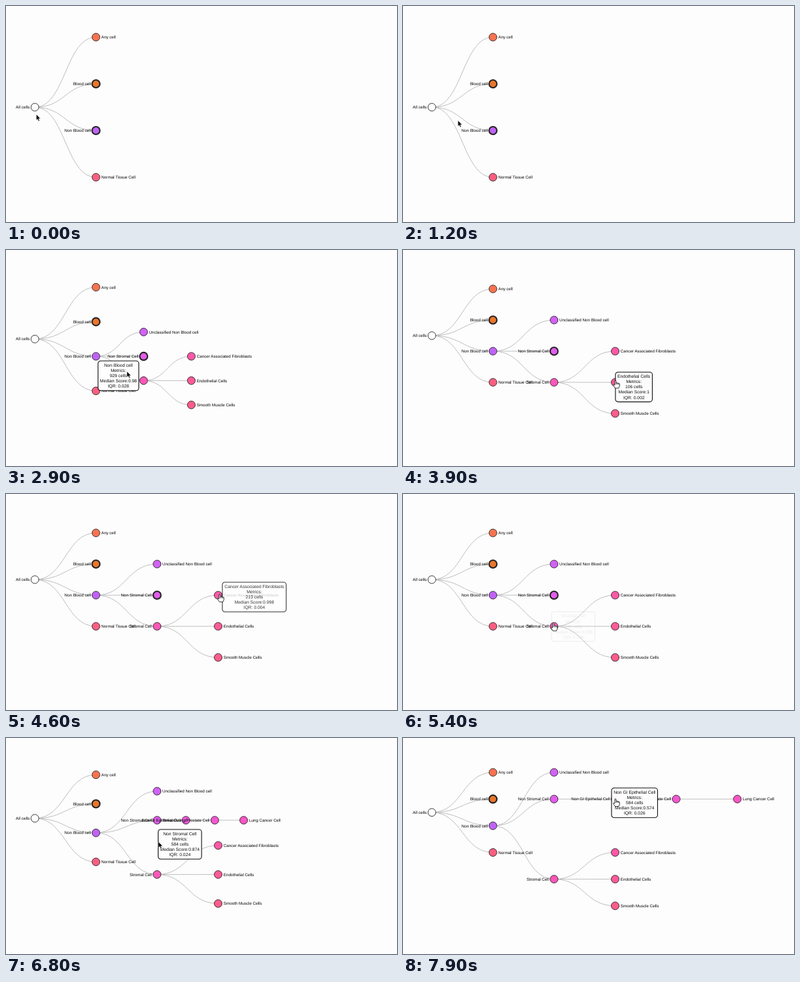
Animation of 600 by 333 pixels, one loop 8000 ms. Source, as an HTML page:

```html
<!DOCTYPE html>
<html lang="en">
<head>
<meta charset="utf-8">
<title>Cell tree</title>
<style>
  html, body { margin: 0; width: 100%; height: 100%; overflow: hidden; background: #fefdfe; }
  svg { display: block; width: 600px; height: 333px; }
  text { font-family: "Liberation Sans", Arial, sans-serif; fill: #000; text-rendering: geometricPrecision; }
  .label { font-size: 6.25px; }
  .tip text { font-size: 6.77px; text-anchor: middle; }
  .link { fill: none; stroke: #b2b2b2; stroke-width: .85; }
  .node { stroke: #222; }
</style>
</head>
<body>
<svg id="stage" viewBox="0 0 600 333"></svg>
<script>
const LOOP = 8000, STEP = 100, EXPAND = 750;
const COLUMN = 93.75, LEFT = 44.3;
const stage = document.getElementById('stage');

function add(parent, tag, attrs = {}, text = '') {
  const el = document.createElementNS('http://www.w3.org/2000/svg', tag);
  set(el, attrs);
  el.textContent = text;
  parent.append(el);
  return el;
}
function set(el, attrs) {
  for (const key in attrs) el.setAttribute(key, attrs[key]);
}
const clamp = v => Math.max(0, Math.min(1, v));
const mix = (a, b, k) => a + (b - a) * k;
const cubic = k => k < .5 ? 4 * k ** 3 : 1 - 4 * (1 - k) ** 3;

// Each layout places row r at top + r * gap; opening a node starts the next one.
const layouts = [
  { top: 48, gap: 72, start: 0 },
  { top: 60, gap: 48, start: 2435, opened: 'nonBlood' },
  { top: 53, gap: 41.15, start: 6432, opened: 'nonStromal' }
];

const nodes = {};
function node(id, parent, name, fill, rows, side = 'right', opens = 0) {
  const depth = parent ? nodes[parent].depth + 1 : 0;
  nodes[id] = { id, parent, name, fill, rows, side, opens, depth, born: 3 - rows.length };
}
node('all', '', 'All cells', '#fff', [1.5, 1.5, 1.5], 'left');
node('any', 'all', 'Any cell', '#f77350', [0, 0, 0]);
node('blood', 'all', 'Blood cell', '#e9762c', [1, 1, 1], 'left', Infinity);
node('nonBlood', 'all', 'Non Blood cell', '#bf63f5', [2, 2, 2], 'left', layouts[1].start);
node('normal', 'all', 'Normal Tissue Cell', '#fb5f80', [3, 3, 3]);
node('unclassified', 'nonBlood', 'Unclassified Non Blood cell', '#d162f3', [1, 0]);
node('nonStromal', 'nonBlood', 'Non Stromal Cell', '#e05dea', [2, 1], 'left', layouts[2].start);
node('stromal', 'nonBlood', 'Stromal Cell', '#fb57b8', [3, 4], 'left');
node('fibro', 'stromal', 'Cancer Associated Fibroblasts', '#fd59a6', [2, 3]);
node('endo', 'stromal', 'Endothelial Cells', '#fd5b98', [3, 4]);
node('smooth', 'stromal', 'Smooth Muscle Cells', '#fd5d8b', [4, 5]);
node('nonGI', 'nonStromal', 'Non GI Epithelial Cell', '#ec59dc', [1], 'left');
node('organs', 'nonGI', 'Breast/Lung/Prostate Cell', '#f357d0', [1], 'left');
node('lung', 'organs', 'Lung Cancer Cell', '#f956c4', [1]);

const tips = [
  { id: 'nonBlood', x: 140.7, y: 167, from: 0, show: 2050, hide: 2450 },
  { id: 'nonBlood', x: 141.2, y: 171, from: 1, show: 2450, hide: 2900 },
  { id: 'endo', x: 326, y: 188.3, from: 0, show: 3600, hide: 4100 },
  { id: 'fibro', x: 332, y: 136, from: 0, show: 4350, hide: 4950 },
  { id: 'stromal', x: 228, y: 181.5, from: 0, show: 5380, hide: 5950 },
  { id: 'nonStromal', x: 233.5, y: 141, from: 0, show: 6200, hide: 6820 },
  { id: 'nonGI', x: 320, y: 77, from: 0, show: 7450, hide: LOOP }
];
const metrics = {
  nonBlood: [929, '0.98', '0.028', 62.6],
  endo: [106, '1', '0.002', 56.6],
  fibro: [213, '0.998', '0.004', 98],
  stromal: [345, '0.996', '0.006', 66.6],
  nonStromal: [584, '0.874', '0.024', 66.6],
  nonGI: [584, '0.574', '0.026', 70.6]
};

// Pointer stops: time, x, y
const route = [
  [0, 46.5, 167], [100, 46.5, 167], [800, 80, 176], [1050, 80, 176], [1900, 132, 181],
  [2150, 140, 189], [2550, 141, 191], [2900, 185.5, 187], [3600, 321, 200], [3800, 326, 201],
  [4000, 326, 201], [4200, 335, 178], [4450, 328, 154], [4850, 328, 155], [5350, 230.5, 199],
  [5900, 230.5, 199], [6200, 233, 157], [6500, 233.5, 158], [6800, 234, 160],
  [7000, 236, 158], [7500, 322, 94], [7700, 326, 93.5], [LOOP, 326, 93.5]
];

function pointerAt(t) {
  const i = Math.max(1, route.findIndex(stop => stop[0] > t));
  const [t0, x0, y0] = route[i - 1], [t1, x1, y1] = route[i];
  const k = (t - t0) / (t1 - t0), s = k * k * (3 - 2 * k);
  return { x: mix(x0, x1, s), y: mix(y0, y1, s) };
}

function placeIn(n, index) {
  if (index < n.born) return placeIn(nodes[layouts[n.born].opened], index);
  const { top, gap } = layouts[index];
  return { x: LEFT + n.depth * COLUMN, y: top + n.rows[index - n.born] * gap };
}

const linkLayer = add(stage, 'g'), nodeLayer = add(stage, 'g');
for (const n of Object.values(nodes)) {
  if (n.parent) n.link = add(linkLayer, 'path', { class: 'link' });
  n.group = add(nodeLayer, 'g');
  n.circle = add(n.group, 'circle', { class: 'node', r: 6, fill: n.fill });
  const left = n.side === 'left';
  add(n.group, 'text', {
    class: 'label', x: left ? -8 : 8.3, y: 2.2, 'text-anchor': left ? 'end' : 'start'
  }, n.name);
}

for (const tip of tips) {
  const [cells, median, iqr, width] = metrics[tip.id];
  const lines = [nodes[tip.id].name, 'Metrics:', `${cells} cells`, `Median Score:${median}`, `IQR: ${iqr}`];
  tip.group = add(stage, 'g', { class: 'tip', transform: `translate(${tip.x} ${tip.y})` });
  add(tip.group, 'rect', { width, height: 45.8, rx: 4, fill: '#fff', stroke: '#000', 'stroke-width': 1.1 });
  lines.forEach((line, i) => add(tip.group, 'text', { x: width / 2, y: 8.9 + i * 8.1 }, line));
}

const arrow = add(stage, 'path', {
  d: 'M0 0V9L2 7.2L3.5 10.5L5 9.8L3.6 6.7H6.4Z', fill: '#000', stroke: '#fff', 'stroke-width': .5
});
const hand = add(stage, 'path', {
  d: 'M-1 .8Q0-.6 1 .8V4Q2 3 3 4.2Q4 3.5 4.8 4.7Q6.4 4.2 6.4 6V8.5L5 12H-.5L-3.4 7.6Q-3.6 5.6-1 7.3Z' +
     'M1 4V6.3M3 4.4V6.3M4.8 4.9V6.5',
  fill: '#fff', stroke: '#000', 'stroke-width': .8
});

function render(t) {
  const index = layouts.findLastIndex(l => t >= l.start);
  const k = cubic(clamp((t - layouts[index].start) / EXPAND));
  const pointer = pointerAt(t);
  let hovering = false;

  for (const n of Object.values(nodes)) {
    const visible = index >= n.born;
    n.group.style.display = visible ? '' : 'none';
    if (n.link) n.link.style.display = n.group.style.display;
    if (!visible) continue;
    const a = placeIn(n, Math.max(0, index - 1)), b = placeIn(n, index);
    n.x = mix(a.x, b.x, k);
    n.y = mix(a.y, b.y, k);
    set(n.group, { transform: `translate(${n.x} ${n.y})` });
    set(n.circle, { 'stroke-width': t < n.opens ? 2.1 : .9 });
    if (n.link) {
      const p = nodes[n.parent], mid = (p.x + n.x) / 2;
      set(n.link, { d: `M${p.x} ${p.y}C${mid} ${p.y} ${mid} ${n.y} ${n.x} ${n.y}` });
    }
    if (Math.hypot(pointer.x - n.x, pointer.y - n.y) < 7) hovering = true;
  }

  const current = tips.findLast(tip => t >= tip.show);
  for (const tip of tips) {
    const shown = mix(tip.from, 1, clamp((t - tip.show) / 300));
    const opacity = tip === current ? .96 * shown * (1 - clamp((t - tip.hide) / 400)) : 0;
    set(tip.group, { opacity });
  }

  const transform = `translate(${pointer.x} ${pointer.y})`;
  set(arrow, { transform, visibility: hovering ? 'hidden' : 'visible' });
  set(hand, { transform, visibility: hovering ? 'visible' : 'hidden' });
}

const begin = performance.now();
function tick() {
  const t = (performance.now() - begin) % LOOP;
  render(Math.floor(t / STEP) * STEP);
  requestAnimationFrame(tick);
}
tick();
</script>
</body>
</html>
```
